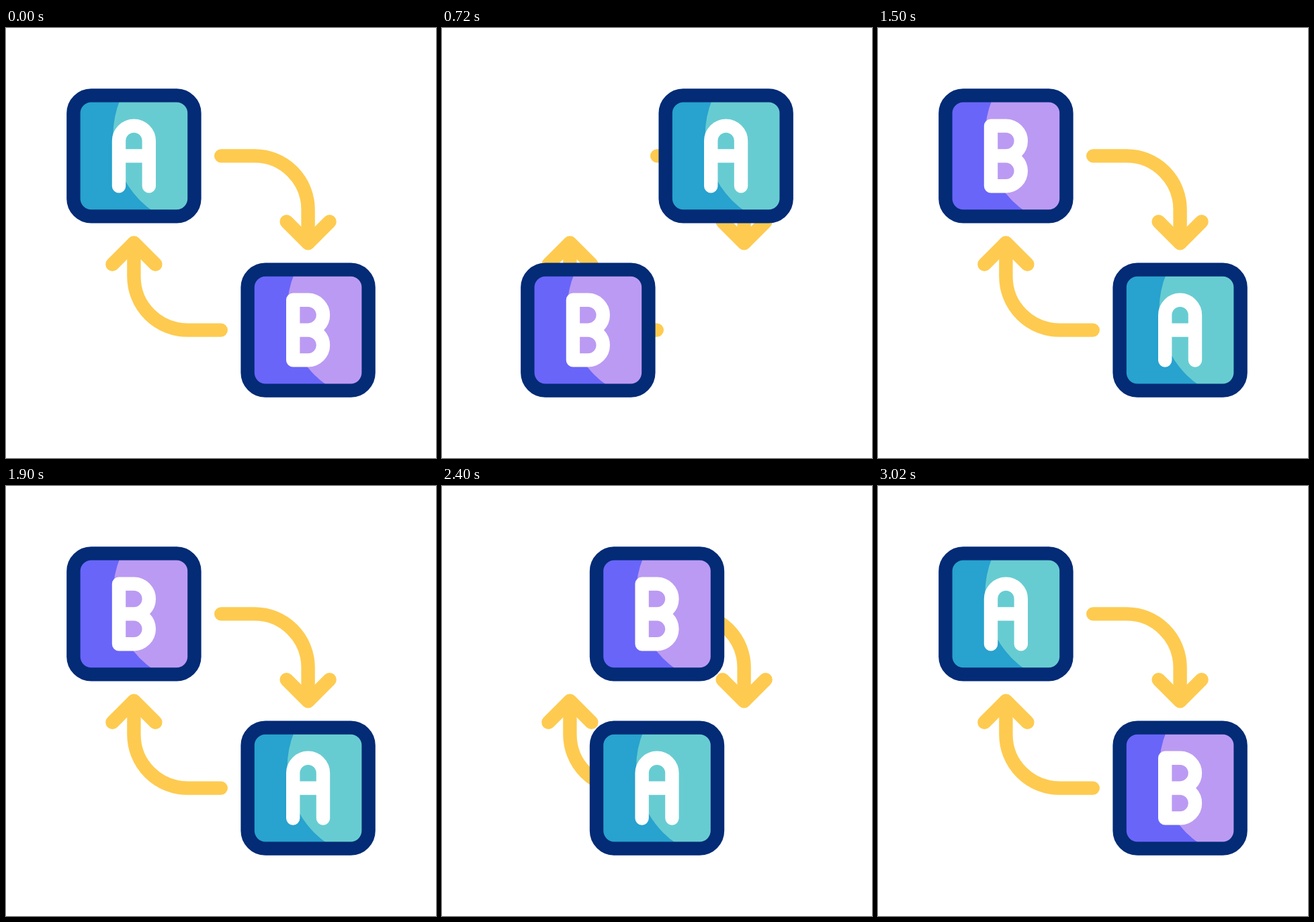
An HTML page that plays this animation: 640 px wide and 640 px high, repeating every 3.6 s.

```html
<!DOCTYPE html>
<html lang="en">
<head>
<meta charset="utf-8">
<title>A and B swap</title>
<style>
  html, body { margin: 0; width: 100%; height: 100%; overflow: hidden; background: #fff; }
  svg { display: block; width: 100%; height: 100%; }
  .line { fill: none; stroke-width: 20.4; stroke-linecap: round; stroke-linejoin: round; }
</style>
</head>
<body>
<svg viewBox="0 0 640 640">
  <defs>
    <clipPath id="face"><rect x="-85" y="-85" width="170" height="170" rx="21"/></clipPath>
    <g id="arrow" class="line" stroke="#fecb50">
      <path d="M320.2 190.4H370a79.6 79.6 0 0 1 79.6 79.6V320"/>
      <path d="M417.6 288.3L449.6 320.2L481.6 288.3"/>
    </g>
    <circle id="shine" cx="107" cy="-31" r="138" clip-path="url(#face)"/>
    <rect id="base" x="-85" y="-85" width="170" height="170" rx="21"/>
    <rect id="frame" class="line" x="-90" y="-90" width="180" height="180" rx="26.5" stroke="#032b76"/>
  </defs>

  <use href="#arrow"/>
  <use href="#arrow" transform="rotate(180 320 320)"/>

  <g id="tileA">
    <use href="#base" fill="#28a2ce"/>
    <use href="#shine" fill="#67ccd1"/>
    <use href="#frame"/>
    <path class="line" stroke="#fff" d="M-22.4 45V-22.4a22.4 22.4 0 0 1 44.8 0V45M-22.4 0H22.4"/>
  </g>
  <g id="tileB">
    <use href="#base" fill="#6965f9"/>
    <use href="#shine" fill="#bb9af3"/>
    <use href="#frame"/>
    <path class="line" stroke="#fff" d="M-22.4 0V-44.8H0a22.4 22.4 0 0 1 0 44.8H-22.4V44.8H0a22.4 22.4 0 0 0 0 -44.8"/>
  </g>
</svg>
<script>
  const LOOP = 3600, STEP = 20;
  const NEAR = 190.4, FAR = 449.6, TILT = 5;

  // Tracks for tile A as [time, value]; B mirrors it through the centre.
  const xTrack = [[400, NEAR], [800, FAR], [2200, FAR], [2600, NEAR]];
  const yTrack = [[800, NEAR], [1200, FAR], [2600, FAR], [3000, NEAR]];
  const tiltTrack = [[1200, 0], [1400, TILT], [1600, -TILT], [1800, TILT], [2000, -TILT], [2200, 0]];

  const tileA = document.getElementById('tileA');
  const tileB = document.getElementById('tileB');

  const ease = p => p * p * (3 - 2 * p);

  function valueAt(track, t) {
    const next = track.findIndex(([time]) => time > t);
    if (next === 0) return track[0][1];
    if (next < 0) return track[track.length - 1][1];
    const [t0, v0] = track[next - 1];
    const [t1, v1] = track[next];
    return v0 + (v1 - v0) * ease((t - t0) / (t1 - t0));
  }

  function place(tile, x, y, tilt) {
    tile.setAttribute('transform', `translate(${x} ${y}) rotate(${tilt})`);
  }

  function draw(time) {
    const t = Math.floor((time % LOOP) / STEP) * STEP;
    const x = valueAt(xTrack, t);
    const y = valueAt(yTrack, t);
    const tilt = valueAt(tiltTrack, t);
    place(tileA, x, y, tilt);
    place(tileB, 640 - x, 640 - y, tilt);
  }

  const start = performance.now();
  function tick() {
    draw(performance.now() - start);
    requestAnimationFrame(tick);
  }
  tick();
</script>
</body>
</html>
```
